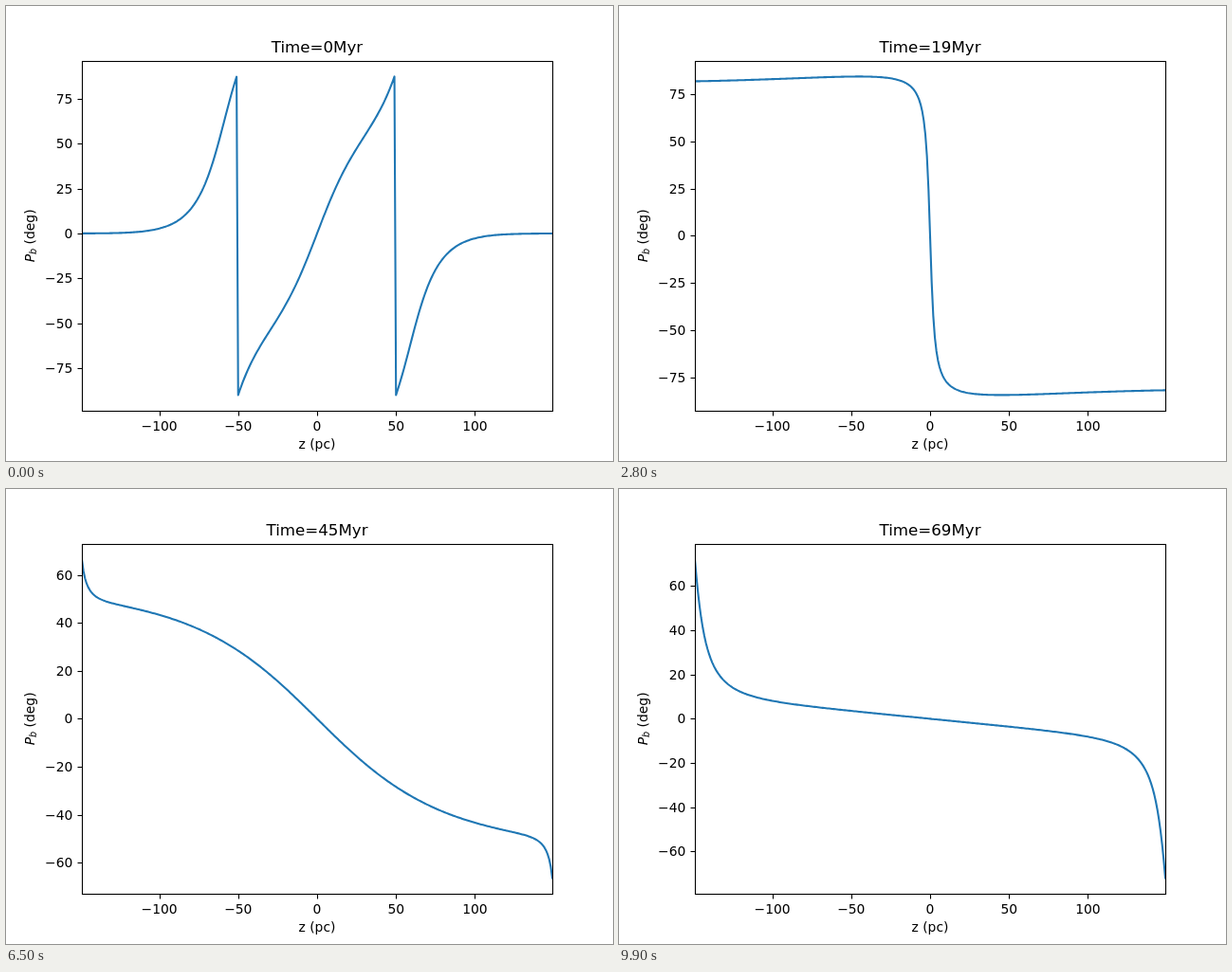
Write an HTML page that moves like this. It is 640 px wide and 480 px high and loops after 10 s.

```html
<!DOCTYPE html>
<html lang="en">
<head>
<meta charset="utf-8">
<title>Pitch angle over time</title>
<style>
  html, body { margin: 0; width: 100%; height: 100%; overflow: hidden; background: #fff; }
  svg { display: block; width: 640px; height: 480px; }
  text { font: 13.889px "DejaVu Sans", sans-serif; fill: #000; }
  .mid { text-anchor: middle; }
  .end { text-anchor: end; }
  #title { font-size: 16.667px; }
  .axis { fill: none; stroke: #000; stroke-width: 1.1; }
  #curve { fill: none; stroke: #1f77b4; stroke-width: 2.08; stroke-linejoin: round; stroke-linecap: square; }
</style>
</head>
<body>
<svg viewBox="0 0 640 480">
  <clipPath id="area"><rect x="80" y="57.6" width="496" height="369.6"/></clipPath>
  <g clip-path="url(#area)"><path id="curve"/></g>
  <rect class="axis" x="80.5" y="58.5" width="496" height="369"/>
  <g id="xticks"></g>
  <g id="yticks"></g>
  <text id="title" class="mid" x="328" y="49"></text>
  <text class="mid" x="328" y="467">z (pc)</text>
  <text class="mid" transform="translate(30 242.4) rotate(-90)"><tspan font-style="italic">P</tspan><tspan font-style="italic" font-size="9.72" dy="2.2">b</tspan><tspan dy="-2.2"> (deg)</tspan></text>
</svg>
<script>
const LOOP = 10000, STEP = 100, ZMAX = 149;
const BOX = { x: 80, y: 57.6, w: 496, h: 369.6 };

// Shape of the field at key times (s): field ratio at the centre, its growth
// with height, its outer falloff, then strength and depth of the edge layer.
const KEYS = [
  { t: 0,   core: 25,   bend: -100,  fall: 3.33,  edge: 0,    depth: 5 },
  { t: 2,   core: 5.2,  bend: -32.3, fall: -0.2,  edge: 0,    depth: 5 },
  { t: 2.8, core: -2.2, bend: -12,   fall: -0.13, edge: 0,    depth: 5 },
  { t: 4.9, core: -25.6, bend: -6,   fall: 0,     edge: 1.4,  depth: 7 },
  { t: 6.5, core: -88,  bend: -18,   fall: 0,     edge: 2.45, depth: 12 },
  { t: 8.5, core: -403, bend: -7,    fall: 0,     edge: 4.15, depth: 15 },
  { t: 9.9, core: -830, bend: 0,     fall: 0,     edge: 6,    depth: 30 }
];

// Monotone cubic through (xs, ys).
function spline(xs, ys) {
  const last = xs.length - 1, h = [], s = [], m = [];
  for (let i = 0; i < last; i++) {
    h[i] = xs[i + 1] - xs[i];
    s[i] = (ys[i + 1] - ys[i]) / h[i];
  }
  for (let i = 1; i < last; i++) {
    const a = 2 * h[i] + h[i - 1], b = h[i] + 2 * h[i - 1];
    m[i] = s[i - 1] * s[i] > 0 ? (a + b) / (a / s[i - 1] + b / s[i]) : 0;
  }
  m[0] = 2 * s[0] - m[1];
  m[last] = 2 * s[last - 1] - m[last - 1];
  return x => {
    let i = 0;
    while (i < last - 1 && x >= xs[i + 1]) i++;
    const t = (x - xs[i]) / h[i], u = 1 - t;
    return ys[i] * u * u * (1 + 2 * t) + ys[i + 1] * t * t * (3 - 2 * t)
      + h[i] * t * u * (m[i] * u - m[i + 1] * t);
  };
}

// Values pass through zero yet grow exponentially, so they are eased on an asinh scale.
function track(name) {
  const f = spline(KEYS.map(k => k.t), KEYS.map(k => Math.asinh(k[name] / 10)));
  return sec => 10 * Math.sinh(f(sec));
}
const core = track("core"), bend = track("bend"), fall = track("fall");
const edge = track("edge"), depth = track("depth");

function profile(sec) {
  const a = core(sec), b = bend(sec), w = fall(sec), e = edge(sec), d = depth(sec);
  const out = [];
  for (let z = -ZMAX; z <= ZMAX; z++) {
    const q = (z / 100) ** 2, gap = 150 - Math.abs(z);
    const ratio = (a + b * q) * Math.exp(w * q);
    const layer = Math.sign(z) * e * Math.exp(-gap / d) / (gap + 1);
    const p = Math.atan(z / ratio - layer) * 180 / Math.PI;
    out.push(p > 89.99 ? -90 : p);
  }
  return out;
}

const $ = id => document.getElementById(id);
const label = v => String(v).replace("-", "\u2212");
const snap = v => Math.round(v) + 0.5;
const xAt = z => BOX.x + BOX.w * (z + ZMAX) / (2 * ZMAX);

$("xticks").innerHTML = [-100, -50, 0, 50, 100].map(z =>
  `<path class="axis" d="M${snap(xAt(z))} 428v4.5"/>` +
  `<text class="mid" x="${xAt(z)}" y="448">${label(z)}</text>`).join("");

function draw(n) {
  const p = profile(n * STEP / 1000);
  const min = Math.min(...p), max = Math.max(...p), pad = (max - min) * 0.05;
  const lo = min - pad, hi = max + pad;
  const yAt = v => BOX.y + BOX.h * (hi - v) / (hi - lo);

  $("curve").setAttribute("d", "M" + p.map((v, i) =>
    xAt(i - ZMAX).toFixed(2) + " " + yAt(v).toFixed(2)).join("L"));

  const gap = [10, 20, 25, 50].find(s => s * 9 >= hi - lo);
  let ticks = "";
  for (let v = Math.ceil(lo / gap) * gap; v <= hi; v += gap) {
    const y = snap(yAt(v));
    ticks += `<path class="axis" d="M75.5 ${y}H80"/>` +
      `<text class="end" x="70.3" y="${y + 4.5}">${label(v)}</text>`;
  }
  $("yticks").innerHTML = ticks;
  $("title").textContent = `Time=${Math.floor(n * 0.7 + 1e-9)}Myr`;
}

let shown = -1;
function tick() {
  const n = Math.floor(performance.now() % LOOP / STEP);
  if (n !== shown) draw(shown = n);
  requestAnimationFrame(tick);
}
tick();
</script>
</body>
</html>
```
